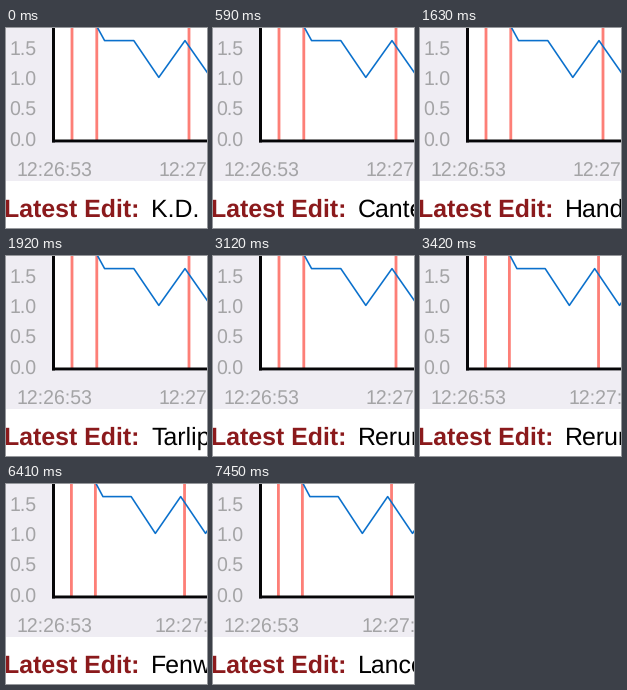
Write a matplotlib script that moves like this. It is 201x200 px and loops after 8 s.

```python
import matplotlib.pyplot as plt
from matplotlib.animation import FuncAnimation
from matplotlib.patches import Rectangle

W, H, DPI = 201, 200, 64
STEP, LOOP = 10, 8000  # ms

plt.rcParams["font.family"] = "Liberation Sans"
plt.rcParams["text.hinting"] = "none"

GREY, PANEL, INK = "#a4a4a6", "#efedf3", "#060608"
RED, BLUE, MAROON = "#fd7f77", "#0a70cc", "#8b1a1c"

# Start time and title of each edit
EDITS = [
    (0, "K.D. Orwin"), (150, "History of"), (590, "Canted"),
    (1040, "California"), (1330, "Market"), (1630, "Handle"),
    (1920, "Tarlip"), (3120, "Rerun"), (5510, "Tarlip"),
    (6410, "Fenwo"), (7310, "Delta"), (7450, "Lancet"),
]

# Chart geometry in pixels, before the time axis is squeezed
X0, Y0 = 48, 112
RESCALE_AT, SQUEEZE = 3420, 0.967
MARKERS = [66, 90.8, 183]
CURVE = [(78, -25), (98.6, 12.6), (127.8, 12.6), (152.8, 49.4),
         (179, 12.6), (204.7, 49.4), (231, 12.6)]

fig = plt.figure(figsize=(W / DPI, H / DPI), dpi=DPI, facecolor="white")
ax = fig.add_axes([0, 0, 1, 1])
ax.set(xlim=(0, W), ylim=(H, 0))
ax.axis("off")


def px(n):
    """Pixels to points."""
    return n * 72 / DPI


def rect(x, y, w, h, color, z):
    ax.add_patch(Rectangle((x, y), w, h, fc=color, ec="none",
                           zorder=z, snap=False))


def stroke(color, width, z):
    return ax.plot([], [], color=color, lw=px(width), zorder=z,
                   solid_capstyle="butt", snap=False)[0]


def label(x, y, s, size, color, **kw):
    return ax.text(x, y, s, fontsize=px(size), color=color,
                   va="baseline", zorder=6, **kw)


rect(0, 0, W, 153, PANEL, 0)
rect(X0, 0, W - X0, Y0, "white", 1)
rect(46, 0, 3, 114.4, INK, 5)
rect(46, 111.5, W - 46, 2.9, INK, 5)

for i in range(4):
    label(3.6, 118.8 - 30.6 * i, f"{i / 2:.1f}", 19.5, GREY)
label(10.3, 149, "12:26:53", 19.5, GREY)
next_tick = label(0, 149, "12:27:23", 19.5, GREY)

markers = [stroke(RED, 2.8, 2) for _ in MARKERS]
curve = stroke(BLUE, 1.6, 3)

label(-2, 189, "Latest Edit:", 24.9, MAROON, weight="bold")
title = label(145, 189, "", 24.9, "black")


def update(i):
    t = i * STEP
    k = SQUEEZE if t >= RESCALE_AT else 1

    def sx(x):
        return X0 + (x - X0) * k

    for line, x in zip(markers, MARKERS):
        line.set_data([sx(x)] * 2, [-2, Y0])
    curve.set_data([sx(x) for x, _ in CURVE], [y for _, y in CURVE])
    next_tick.set_x(sx(191) - 38)
    title.set_text([s for start, s in EDITS if start <= t][-1])
    return [*markers, curve, next_tick, title]


anim = FuncAnimation(fig, update, frames=LOOP // STEP, interval=STEP,
                     repeat=True, repeat_delay=0, cache_frame_data=False)
plt.show()
```
